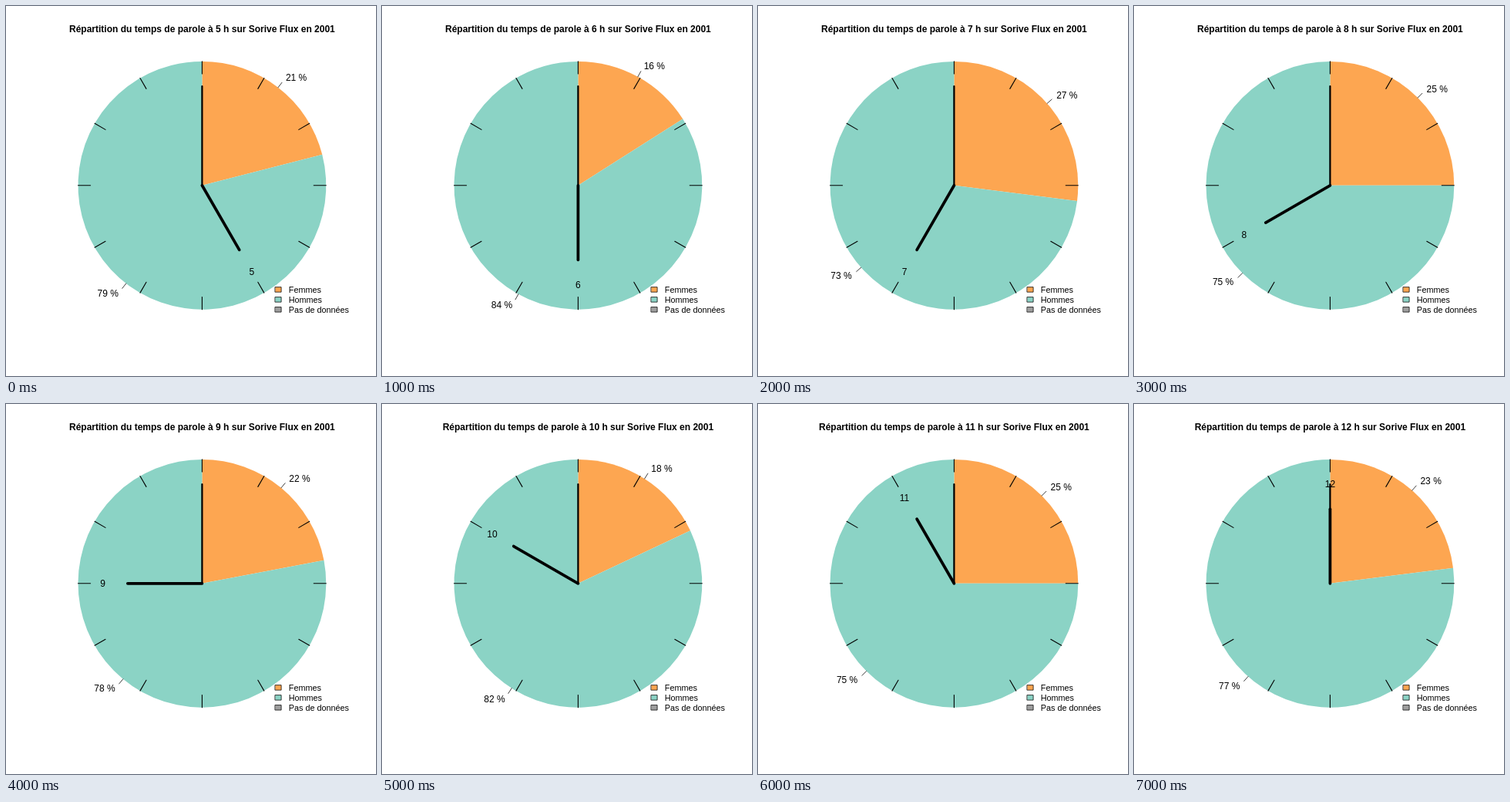
An HTML page with a canvas that plays this animation: 480 by 480 pixels, repeating every 8000 ms.

```html
<!DOCTYPE html>
<html lang="fr">
<head>
<meta charset="utf-8">
<title>Temps de parole</title>
<style>
  html, body { margin: 0; width: 100%; height: 100%; overflow: hidden; background: #fff; }
  canvas { display: block; width: 480px; height: 480px; }
</style>
</head>
<body>
<canvas id="stage" width="480" height="480"></canvas>
<script>
const ctx = document.getElementById("stage").getContext("2d");
const CX = 254.4, CY = 232.8, R = 160.9;
const ORANGE = "#fda651", TEAL = "#8bd3c5", GREY = "#9e9e9e";
const FONT = '"Liberation Sans", Arial, sans-serif';
const FIRST_HOUR = 5, STEP_MS = 1000;
const womenShare = [21, 16, 27, 25, 22, 18, 25, 23];

// Turns are measured clockwise from the top, from 0 to 1.
function polar(turn, radius) {
  const a = turn * 2 * Math.PI;
  return [CX + R * radius * Math.sin(a), CY - R * radius * Math.cos(a)];
}

function wedge(from, to, color) {
  const angle = t => (t - 0.25) * 2 * Math.PI;
  ctx.beginPath();
  ctx.moveTo(CX, CY);
  ctx.arc(CX, CY, R, angle(from), angle(to));
  ctx.closePath();
  ctx.fillStyle = color;
  ctx.fill();
}

function spoke(turn, inner, outer, width) {
  ctx.beginPath();
  ctx.moveTo(...polar(turn, inner));
  ctx.lineTo(...polar(turn, outer));
  ctx.lineWidth = width;
  ctx.stroke();
}

function text(str, x, baseline, align, font = "12px") {
  ctx.font = `${font} ${FONT}`;
  ctx.textAlign = align;
  ctx.fillStyle = "#000";
  ctx.fillText(str, x, baseline);
}

function shareLabel(turn, percent) {
  const [x, y] = polar(turn, 1.1);
  spoke(turn, 1, 1.05, 0.75);
  text(`${percent} %`, x, y + 4.3, turn < 0.5 ? "left" : "right");
}

function legend() {
  [["Femmes", ORANGE], ["Hommes", TEAL], ["Pas de données", GREY]].forEach(([name, color], i) => {
    const y = 367.9 + i * 12.96;
    ctx.fillStyle = color;
    ctx.lineWidth = 0.75;
    ctx.fillRect(349.3, y - 3.25, 7.8, 6.5);
    ctx.strokeRect(349.3, y - 3.25, 7.8, 6.5);
    text(name, 366.8, y + 4.1, "left", "10.8px");
  });
}

function draw(index) {
  const hour = FIRST_HOUR + index;
  const women = womenShare[index];
  const split = women / 100;

  ctx.fillStyle = "#fff";
  ctx.fillRect(0, 0, 480, 480);
  ctx.strokeStyle = "#000";
  ctx.lineCap = ctx.lineJoin = "round";

  wedge(0, split, ORANGE);
  wedge(split, 1, TEAL);
  shareLabel(split / 2, women);
  shareLabel((1 + split) / 2, 100 - women);

  for (let i = 0; i < 12; i++) spoke(i / 12, 0.9, 1, 1.1);
  spoke(0, 0, 0.8, 2.25);
  spoke(hour / 12, 0, 0.6, 3.75);

  const [x, y] = polar(hour / 12, 0.8);
  text(hour, x, y + 4.3, "center");
  text(`Répartition du temps de parole à ${hour} h sur Sorive Flux en 2001`, CX, 34, "center", "bold 12px");
  legend();
}

function tick() {
  draw(Math.floor(performance.now() / STEP_MS) % womenShare.length);
  requestAnimationFrame(tick);
}
tick();
</script>
</body>
</html>
```
